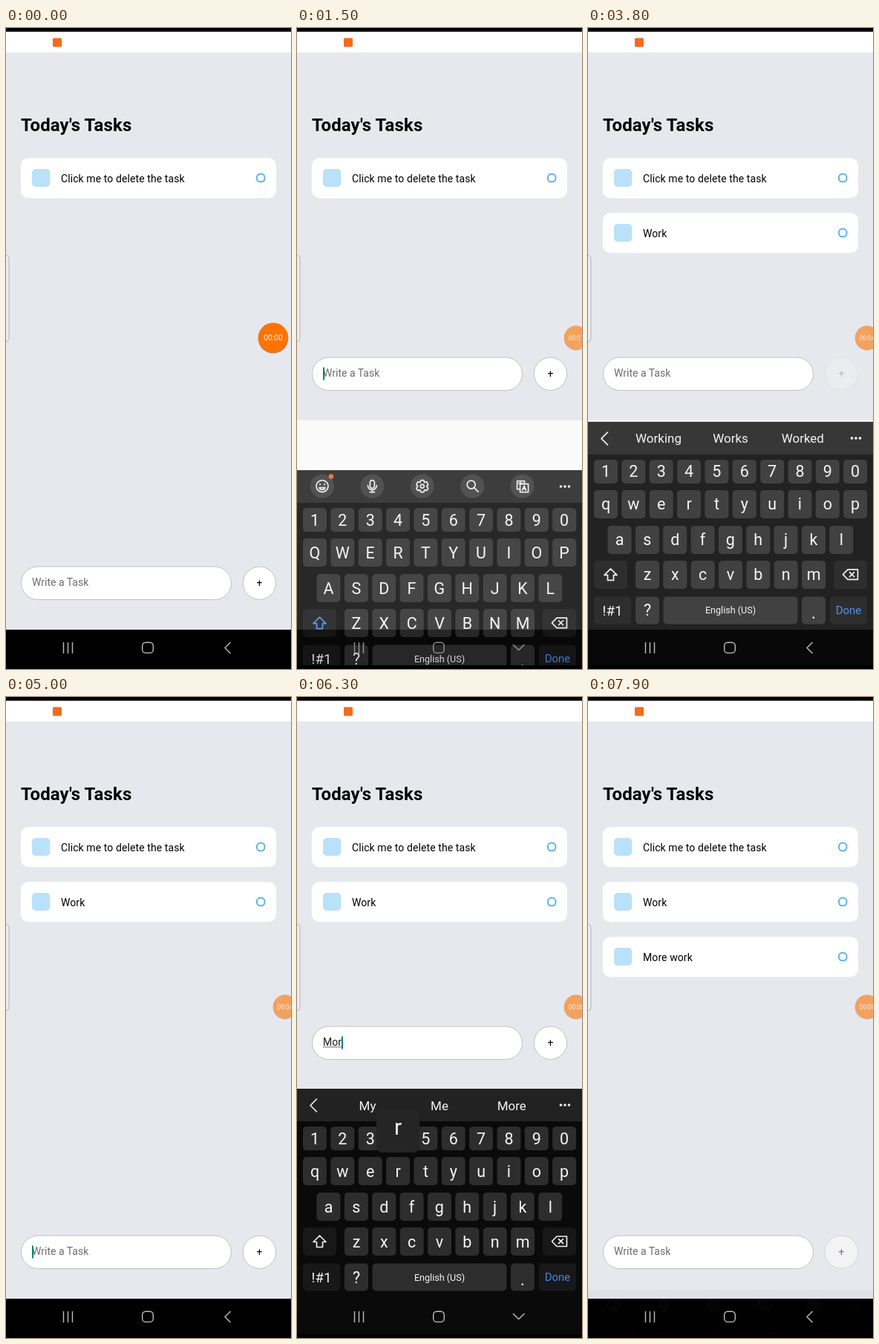
Animation, 384 px wide and 864 px high, one loop 8000 ms. Source, as an HTML page:

```html
<!DOCTYPE html>
<html lang="en">
<head>
<meta charset="utf-8">
<title>Today's Tasks</title>
<style>
html, body { margin: 0; width: 100%; height: 100%; overflow: hidden; background: #000; }
svg { display: block; width: 100vw; height: 100vh; font-family: Roboto, sans-serif; }
.line { fill: none; stroke: #eee; stroke-width: 1.7; stroke-linecap: round; stroke-linejoin: round; }
.nav { fill: none; stroke: #bdbdbd; stroke-width: 1.4; }
.mid { text-anchor: middle; }
.spaced { letter-spacing: .09px; }
.field { fill: #fff; stroke: #c0c0c0; }
.key { fill: #2d2d2d; }
.dark { fill: #181818; }
.down { fill: #414141; }
.label { fill: #f6f6f6; font-size: 21.5px; text-anchor: middle; }
.word { fill: url(#reveal); font-size: 17px; text-anchor: middle; }
</style>
</head>
<body>
<svg viewBox="0 0 384 864" preserveAspectRatio="none">
  <defs>
    <linearGradient id="reveal">
      <stop stop-color="#f2f2f2"/>
      <stop offset="1" stop-color="#f2f2f2"/>
    </linearGradient>
  </defs>
  <rect width="384" height="864"/>
  <rect y="5" width="384" height="806" fill="#fafafa"/>
  <rect y="5" width="384" height="28" fill="#fff"/>
  <rect x="63" y="13.5" width="12" height="12" rx="1.5" fill="#f26c1c"/>
  <rect id="app" y="33" width="384" height="778" fill="#e7e8ed"/>
  <text class="spaced" x="20" y="139" font-size="24" font-weight="700">Today's Tasks</text>
  <g id="cards"></g>
  <rect x="-8" y="306.5" width="12" height="116" rx="4" fill="#ebecf0" stroke="#b4b5b9"/>
  <g id="form">
    <rect class="field" x="20.5" y="726" width="283" height="44.5" rx="22.25"/>
    <text id="hint" x="35" y="752" font-size="14" fill="#6c6c6c">Write a Task</text>
    <text id="typed" x="35" y="752" font-size="14" fill="#1c1c1c"></text>
    <rect id="under" y="753.3" height="1" fill="#666"/>
    <rect id="caret" y="739.5" width="2" height="17" fill="#0b8277"/>
    <g id="add">
      <circle class="field" cx="341.5" cy="748.25" r="22.2"/>
      <text class="mid" x="341.5" y="753" font-size="14">+</text>
    </g>
  </g>
  <g id="bubble">
    <circle cy=".8" r="20.3" fill="#8a8c94"/>
    <circle r="20.2" fill="#ff7300"/>
    <text class="mid" y="3.8" font-size="10.3" fill="#fff0e2" id="clock"></text>
  </g>
  <g id="board">
    <rect y="528" width="384" height="332" fill="#0a0a0a"/>
    <rect y="528" width="384" height="44" fill="#222"/>
    <g id="tools"></g>
    <g id="strip">
      <path class="line" d="M26.5 542L18 550.5L26.5 559"/>
      <g id="words"></g>
    </g>
    <g fill="#f0f0f0"><circle cx="355.5" cy="550" r="1.8"/><circle cx="361" cy="550" r="1.8"/><circle cx="366.5" cy="550" r="1.8"/></g>
    <g id="keys"></g>
    <path id="shift" class="line" d="M30.5 726L22 734.5H26.5V741.5H34.5V734.5H39Z"/>
    <path class="line" d="M350 727H363.5V740.5H350L343.5 733.75ZM352.5 730.7L358.5 736.7M358.5 730.7L352.5 736.7"/>
    <g id="pop">
      <rect x="-29" y="-83" width="58" height="58" rx="8" fill="#252525"/>
      <text class="label" id="popText" y="-49.5" style="font-size:30px"></text>
    </g>
  </g>
  <g id="navIcons" class="nav">
    <path d="M77.5 828V843M83.5 828V843M89.5 828V843"/>
    <rect x="183.7" y="828.2" width="14.6" height="14.2" rx="4.5"/>
    <path id="back" d="M302.5 828L295 835.5L302.5 843"/>
    <path id="hide" d="M291 831L298.7 838.5L306.5 831"/>
  </g>
  <rect y="859" width="384" height="5"/>
</svg>
<script>
const LOOP = 8000, DROP = 332, SLIDE = 290;
const $ = id => document.getElementById(id);
const NS = 'http://www.w3.org/2000/svg';

function add(parent, tag, attrs, text) {
  const el = document.createElementNS(NS, tag);
  for (const k in attrs) el.setAttribute(k, attrs[k]);
  if (text) el.textContent = text;
  parent.append(el);
  return el;
}
const set = (el, k, v) => el.setAttribute(k, v);
const show = (el, on) => { el.style.display = on ? '' : 'none'; };
const ramp = (t, a, b) => Math.min(1, Math.max(0, (t - a) / (b - a)));
const mix = (a, b, p) => a + (b - a) * p;

// Task cards
const cards = ['Click me to delete the task', 'Work', 'More work'].map((label, i) => {
  const g = add($('cards'), 'g', { transform: `translate(20 ${175.3 + i * 74})` });
  add(g, 'rect', { width: 344, height: 54, rx: 10, fill: '#fff' });
  add(g, 'rect', { x: 15, y: 14.7, width: 24.3, height: 24, rx: 5, fill: '#b9e1f9' });
  add(g, 'text', { class: 'spaced', x: 54, y: 32.7, 'font-size': 14 }, label);
  add(g, 'rect', { x: 318, y: 21.5, width: 10.5, height: 10.5, rx: 4.5, fill: 'none', stroke: '#5cb5e6', 'stroke-width': 2 });
  return g;
});

// Keyboard
const keys = {}, letters = [];
function key(x, y, w, h, label, cls = 'key', size = 21.5, dy = 7.6, fill = '') {
  const box = add($('keys'), 'rect', { class: cls, x: x - w / 2, y: y - h / 2, width: w, height: h, rx: 5 });
  const text = add($('keys'), 'text', { class: 'label', x, y: y + dy, style: `font-size:${size}px;fill:${fill}` }, label);
  keys[label] = { box, x, y };
  return text;
}
[['1234567890', 24, 595, 32], ['qwertyuiop', 24, 639, 38], ['asdfghjkl', 42.5, 687, 38], ['zxcvbnm', 80, 734, 38]]
  .forEach(([row, x, y, h]) => [...row].forEach((c, i) => {
    const text = key(x + i * 37.35, y, 32, h, c);
    if (y > 600) letters.push({ text, c });
  }));
key(30.5, 734, 45, 38, '', 'dark');
key(353.5, 734, 45, 38, '', 'dark');
key(33, 782, 50, 37, '!#1', 'dark', 18.7, 6.8);
key(80, 782, 32, 37, '?');
key(192, 782, 181, 37, 'English (US)', 'key', 12.6, 4.6);
key(304, 782, 32, 37, '.', 'key', 24, 11);
key(351, 782, 50, 37, 'Done', 'dark', 15, 5.4, '#4287ee');

// Toolbar glyphs, each centred on its disc
const glyphs = [
  'M-8 0A8 8 0 1 0 8 0A8 8 0 1 0-8 0M-4 2A4.3 4.3 0 0 0 4 2ZM-3-3V-2M3-3V-2',
  'M-3-5A3 3 0 0 1 3-5V0A3 3 0 0 1-3 0ZM-6-1A6 6 0 0 0 6-1M0 5V8M-3 8H3',
  'M-2-8H2L3-5L6-6L8-2L6 0L8 3L6 6L3 5L2 8H-2L-3 5L-6 6L-8 3L-6 0L-8-2L-6-6L-3-5ZM-2.5 0A2.5 2.5 0 1 0 2.5 0A2.5 2.5 0 1 0-2.5 0',
  'M-7-2A5.5 5.5 0 1 0 4-2A5.5 5.5 0 1 0-7-2M3 2.5L8 7.5',
  'M-3 4H-7V-7H3V-3M-3-3H8V8H-3ZM0 5.5L2.5-.5L5 5.5M1 3.5H4M-5-4H0M-2.5-5V-4'
];
glyphs.forEach((d, i) => {
  const g = add($('tools'), 'g', { transform: `translate(${34 + i * 67.4} 549.5)` });
  add(g, 'circle', { r: 16, fill: '#3b3b3b' });
  add(g, 'path', { class: 'line', d });
});
const badge = add($('tools'), 'circle', { cx: 46, cy: 536.5, r: 3.3, fill: '#f0632a' });
const words = [95, 192, 289.3].map(x => add($('words'), 'text', { class: 'word', x, y: 556.5 }));
const stops = document.querySelectorAll('#reveal stop');

// Timeline
const sessions = [
  { focus: 1100, open: 1382, close: 3774, tap: 3500 },
  { focus: 5000, open: 5160, close: 7639, tap: 7400 }
];
const typing = [
  [2600, 'W'], [2800, 'Wo'], [2950, 'Wor'], [3250, 'Work'], [3710, ''],
  [5700, 'M'], [6000, 'Mo'], [6200, 'Mor'], [6400, 'More'], [6500, 'More '],
  [6620, 'More w'], [6780, 'More wo'], [6900, 'More wor'], [7050, 'More work'], [7580, '']
];
const hints = [
  [2700, ''], [2900, 'We What When'], [3130, 'Work Word World'], [3380, 'Working Works Worked'],
  [5750, ''], [5950, 'My Me More'], [6420, 'More Morning Moreover'], [6700, 'We Was With'], [7000, 'Work Word World'],
  [7150, 'Work Working Works']
];
const latest = (list, t) => list.filter(e => e[0] <= t).pop() || [-LOOP, ''];

function draw(t) {
  const s = t < 4300 ? sessions[0] : sessions[1];
  const { focus, open, close, tap } = s;
  const active = t >= open && t < close + SLIDE;

  // Page
  const raised = t >= open && t < close + 90;
  set($('app'), 'height', raised ? 495.5 : 778);
  set($('form'), 'transform', `translate(0 ${raised ? -282 : 0})`);
  cards.forEach((c, i) => show(c, !i || t >= sessions[i - 1].close - 60));

  // Text field
  const [typedAt, text] = latest(typing, t);
  $('typed').textContent = text;
  show($('hint'), !text);
  const width = text ? $('typed').getComputedTextLength() : 0;
  const start = text.indexOf(' ') + 1;
  const from = start ? $('typed').getSubStringLength(0, start) : 0;
  set($('under'), 'x', 35 + from);
  set($('under'), 'width', Math.max(0, width - from));
  set($('caret'), 'x', 35 + width);
  const blinkFrom = text ? typedAt : focus;
  show($('caret'), t >= focus && t < close - 60 && Math.floor((t - blinkFrom) / 500) % 2 === 0);
  const back = ramp(t, close + 140, close + 340);
  set($('add'), 'opacity', t < tap ? 1 : mix(mix(1, .2, ramp(t, tap, tap + 100)), 1, back * back));

  // Recorder bubble
  const p = ramp(t, 800, 1100);
  set($('bubble'), 'transform', `translate(${mix(360, 376, p)} 417.5) scale(${mix(1, .8, p)})`);
  set($('bubble'), 'opacity', mix(1, .6, p));
  const secs = t > 4100 && t < 5100 ? 4 : t < 800 ? 0 : Math.floor((t + 300) / 1000);
  $('clock').textContent = '00:0' + secs;

  // Keyboard slide
  const rise = 1 - (1 - ramp(t, open, open + SLIDE)) ** 3;
  const fall = ramp(t, close, close + SLIDE);
  show($('board'), active);
  set($('board'), 'transform', `translate(0 ${DROP * (1 - rise + fall * fall)})`);
  set($('board'), 'opacity', Math.min(1, rise * 1.1) * (1 - ramp(fall, 0, .93)));
  const down = t >= open && t < close;
  show($('hide'), down);
  show($('back'), !down);
  set($('navIcons'), 'opacity', active && rise < 1 ? .75 : 1);

  // Key caps
  const upper = t < 2700 || (t > 4100 && t < 5800);
  for (const k of letters) k.text.textContent = upper ? k.c.toUpperCase() : k.c;
  $('shift').style.stroke = upper ? '#4a8cf5' : '';
  const last = text.slice(-1);
  const held = t - typedAt;
  const hit = last ? keys[last === ' ' ? 'English (US)' : last.toLowerCase()] : null;
  for (const k in keys) keys[k].box.classList.toggle('down', keys[k] === hit && held < 80);
  const popped = hit && last !== ' ' && held < 140;
  show($('pop'), popped);
  if (popped) {
    set($('pop'), 'transform', `translate(${hit.x} ${hit.y})`);
    $('popText').textContent = last;
  }

  // Suggestions
  const [hintAt, line] = latest(hints, t);
  const strip = hintAt > focus && t < close + 150;
  show($('strip'), strip);
  show($('tools'), !strip);
  show(badge, t < 2200);
  const list = line.split(' ');
  words.forEach((w, i) => { w.textContent = list[i] || ''; });
  const fresh = hintAt === 2900 || hintAt === 5950;
  const r = fresh ? ramp(t, hintAt, hintAt + 200) : 1;
  set(stops[0], 'stop-opacity', Math.min(1, r * 1.4));
  set(stops[1], 'stop-opacity', Math.max(0, r * 2 - 1));
}

const began = performance.now();
function tick() {
  draw((performance.now() - began) % LOOP);
  requestAnimationFrame(tick);
}
tick();
</script>
</body>
</html>
```
